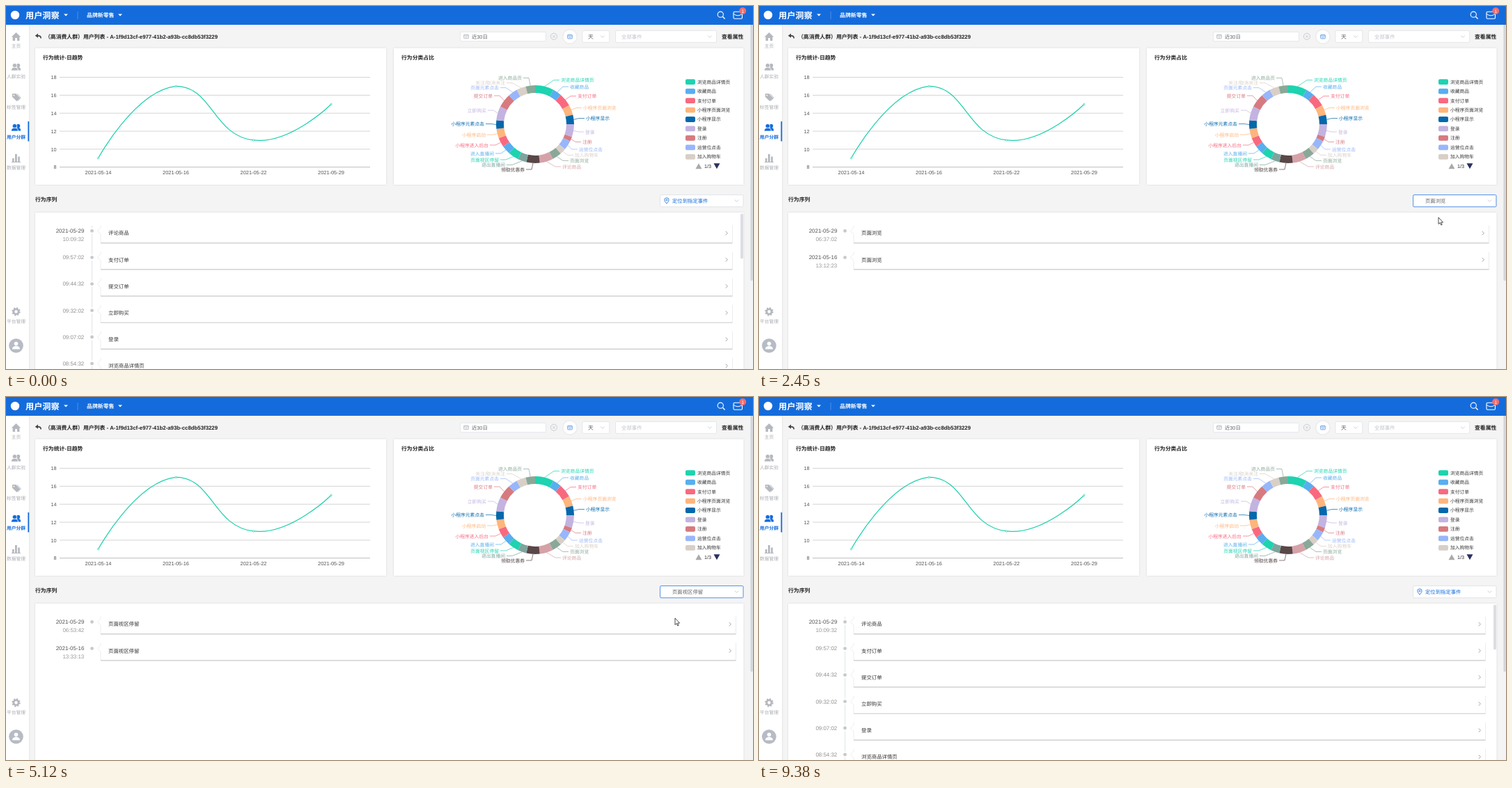
Write an HTML page that moves like this. It is 1073x522 px and loops after 9.49 s.

```html
<!DOCTYPE html>
<html lang="zh-CN">
<head>
<meta charset="utf-8">
<title>用户洞察</title>
<style>
html, body { margin: 0; width: 100%; height: 100%; overflow: hidden; background: #f4f4f5; }
svg { display: block; width: 1073px; height: 522px; }
text { font-family: "Liberation Sans", "Noto Sans CJK SC", "Noto Sans CJK", sans-serif; text-rendering: geometricPrecision; white-space: pre; }
.card { filter: drop-shadow(0 .6px 1px rgba(0,0,0,.13)); }
.pop { filter: drop-shadow(0 1px 3px rgba(0,0,0,.16)); }
</style>
</head>
<body>
<svg id="stage" viewBox="0 0 1073 522" xmlns="http://www.w3.org/2000/svg"></svg>
<script>
const LOOP = 9490, BLUE = '#146cdc', GRAY = '#b5b8be';
const stage = document.getElementById('stage');

// ---- drawing helpers ----
const text = (x, cy, s, size, fill, extra = '') =>
  `<text x="${x}" y="${cy + size * .37}" font-size="${size}" fill="${fill}" ${extra}>${s}</text>`;
const rect = (x, y, w, h, fill, extra = '') =>
  `<rect x="${x}" y="${y}" width="${w}" height="${h}" fill="${fill}" ${extra}/>`;
const path = (d, fill, extra = '') => `<path d="${d}" fill="${fill}" ${extra}/>`;
const line = (d, color, width = 1) => path(d, 'none', `stroke="${color}" stroke-width="${width}"`);
const circle = (x, y, r, fill, extra = '') => `<circle cx="${x}" cy="${y}" r="${r}" fill="${fill}" ${extra}/>`;
const group = (s, extra = '') => `<g ${extra}>${s}</g>`;
const BOLD = 'font-weight="700"', END = 'text-anchor="end"', MID = 'text-anchor="middle"';
const down = (x, y, color = '#c0c4cc', r = 2.8) =>
  line(`M${x - r} ${y - r / 2}L${x} ${y + r / 2}L${x + r} ${y - r / 2}`, color, .8);
const caret = (x, y) => path(`M${x - 3} ${y - 1.4}h6l-3 3z`, '#fff');
const field = (x, y, w, h) => rect(x, y, w, h, '#fff', 'rx="1.5" stroke="#dfe1e6" stroke-width=".8"');
const calendar = (x, y, color) =>
  rect(x - 3.3, y - 2.7, 6.6, 5.6, 'none', `rx=".8" stroke="${color}" stroke-width=".8"`) +
  line(`M${x - 3} ${y - 1}h6M${x - 1.8} ${y + 1}h3.6`, color, .7);

// ---- header and sidebar ----
function header() {
  return rect(0, 0, 1073, 27, BLUE) + circle(13, 13, 6.2, '#fff') +
    text(28, 13.2, '用户洞察', 12.2, '#fff', BOLD) + caret(86, 13) +
    line('M103 8v11', '#5f9be8', .8) +
    text(116, 13.2, '品牌新零售', 7.9, '#fff', BOLD) + caret(164, 13) +
    circle(1026.3, 12.2, 4.1, 'none', 'stroke="#fff" stroke-width="1.1"') + line('M1029.4 15.3l3.2 3.2', '#fff', 1.4) +
    rect(1045, 8.2, 12.5, 10, 'none', 'rx="1.5" stroke="#fff" stroke-width="1.1"') +
    line('M1045 11.3q6.2 5 12.5 0', '#fff', 1) +
    circle(1058.2, 7, 5, '#f56c6c') + text(1058.2, 7, '1', 6.8, '#fff', MID);
}

const people = (y, c) =>
  circle(17.6, y - 2.6, 2.6, c) + path(`M14 ${y + 4.4}q0-4.4 3.6-4.4t3.6 4.4z`, c) +
  group(circle(12.4, y - 2.4, 3.2, c) + path(`M7.4 ${y + 5}q0-4.8 5-4.8t5 4.8z`, c), 'stroke="#fff" stroke-width=".8"');

function sidebar() {
  const names = [['主页', 57.5], ['人群实验', 101], ['标签管理', 145], ['用户分群', 188.5],
    ['数据管理', 232.5], ['平台管理', 453]];
  return rect(0, 27, 33, 495, '#fff', 'class="card"') +
    path('M7.8 44.6 14.5 38l6.7 6.6h-1.8V50h-3.5v-4h-2.8v4H9.6v-5.4z', GRAY) +
    people(88, GRAY) +
    path('M9 126h5.2l6 6.2-4.7 4.8L9 130.8z', GRAY) + circle(11.4, 128.4, 1, '#fff') +
    line('M16 126.2l5 5.6-3.8 4.6', GRAY, 1) +
    people(175, BLUE) + rect(31.4, 166, 1.8, 28.5, BLUE) +
    rect(9, 219, 2.6, 5, GRAY) + rect(13, 213, 2.8, 11, GRAY) + rect(17.2, 216.5, 2.6, 7.5, GRAY) + rect(8, 224, 13, 1, GRAY) +
    circle(14.5, 439.5, 3.6, 'none', `stroke="${GRAY}" stroke-width="2.8"`) +
    circle(14.5, 439.5, 5.3, 'none', `stroke="${GRAY}" stroke-width="1.8" stroke-dasharray="2.08"`) +
    circle(14.5, 488.5, 10.3, '#b6bbc5') + circle(14.5, 485.6, 2.8, '#fff') +
    path('M9 493.6q0-4.6 5.5-4.6t5.5 4.6z', '#fff') +
    names.map(([s, y], i) => i == 3 ? text(14.5, y, s, 6.8, BLUE, MID + ' ' + BOLD)
      : text(14.5, y, s, 6.8, '#a9acb3', MID)).join('');
}

function toolbar() {
  return line('M50 46.6V45q-.6-2.4-4.4-2.4', '#444', 1.6) + path('M41.8 42.8l4.2-3.2v6.2z', '#444') +
    text(56, 44, '（高消费人群）', 7.84, '#222', BOLD) +
    text(110.9, 44, '用户列表 - A-1f9d13cf-e977-41b2-a93b-cc8db53f3229', 7.84, '#222', BOLD) +
    field(652.5, 37.3, 123, 13.4) + calendar(661, 43.8, '#a9adb5') + text(669, 44, '近30日', 7.3, '#606266') +
    circle(787, 43.8, 4.6, 'none', 'stroke="#c0c4cc" stroke-width=".8"') + line('M785.2 42l3.6 3.6m0-3.6l-3.6 3.6', '#c0c4cc', .8) +
    circle(810, 44, 9.6, '#fff', 'class="card"') + calendar(810, 44, '#4a8de4') +
    field(827.9, 35.4, 38.8, 17) + text(836, 44, '天', 7.8, '#606266') + down(857, 44) +
    field(875.6, 35.4, 145, 17) + text(884, 44, '全部事件', 7.4, '#c0c4cc') + down(1011, 44) +
    text(1028, 44, '查看属性', 7.84, '#222', BOLD);
}

// ---- charts ----
function trend() {
  const yOf = v => 231.7 - (v - 8) * 12.92;
  const pts = [[132.5, 9], [244, 17], [355.5, 11], [467, 15]].map(([x, v]) => [x, yOf(v)]);
  const days = ['14', '16', '22', '29'];
  let s = rect(42, 60.5, 504, 196.5, '#fff', 'class="card"') + text(53, 74, '行为统计-日趋势', 7.84, '#222', BOLD);
  for (let v = 8; v <= 18; v += 2)
    s += line(`M77 ${yOf(v)}H523`, v == 8 ? '#b5b5b5' : '#d0d0d0', .9) + text(72.5, yOf(v), v, 7.2, '#555', END);

  // smooth curve: handles follow the neighbours and stay between the extremes
  const gap = (a, b) => Math.hypot(b[0] - a[0], b[1] - a[1]);
  const handle = (i, side) => {
    const a = pts[i - 1], p = pts[i], b = pts[i + 1];
    if (!a || !b) return p;
    const near = side > 0 ? gap(p, b) : gap(a, p), k = side * .5 * near / (gap(a, p) + gap(p, b));
    return [p[0] + (b[0] - a[0]) * k, Math.min(yOf(9), Math.max(yOf(17), p[1] + (b[1] - a[1]) * k))];
  };
  const d = pts.map((p, i) => i ? `C${handle(i - 1, 1)} ${handle(i, -1)} ${p}` : 'M' + p).join('');
  s += line(d, '#1dd0ad', 1.2);
  pts.forEach(([x, y], i) => {
    s += circle(x, y, 1.2, '#fff', 'stroke="#1dd0ad" stroke-width=".7"') +
      text(x, 239, '2021-05-' + days[i], 7.4, '#555', MID);
  });
  return s;
}

const HUES = ['#1dd3b0', '#58aeee', '#f8697f', '#ffb57c', '#0468ab', '#c3b3e1', '#d77a80', '#98b6fa', '#d8cfc7',
  '#8aa898', '#d5a2a8', '#5a4747', '#7fa39d'];
// name, end angle, label x, label y
const PARTS = [
  ['浏览商品详情页', 28, 797, 106.5], ['收藏商品', 41, 810, 116], ['支付订单', 61, 821, 129.5],
  ['小程序页面浏览', 76, 829, 146.5], ['小程序显示', 90, 833, 161.5], ['登录', 109, 832, 181],
  ['注册', 116, 828, 195.5], ['运营位点击', 130, 823, 206], ['加入购物车', 139, 817, 214.5],
  ['页面浏览', 153, 810, 222.5], ['评论商品', 173, 799, 231], ['领取优惠券', 193, 745, 235],
  ['退出直播间', 206, 717, 228.5], ['页面视区停留', 222, 708, 221], ['进入直播间', 235, 701, 212],
  ['小程序进入后台', 249, 693, 200], ['小程序启动', 263, 689, 185], ['小程序元素点击', 276, 687, 169.5],
  ['立即购买', 297, 690, 150], ['提交订单', 318, 699, 129], ['页面元素点击', 332, 708, 117.5],
  ['关注/取消关注', 346, 717, 110.5], ['进入商品页', 360, 741, 103.5]];

function donut() {
  const R = 56, r = 45;
  const at = (a, len) => [760 + len * Math.sin(a * Math.PI / 180), 170 - len * Math.cos(a * Math.PI / 180)];
  let s = rect(557, 60.5, 502.5, 196.5, '#fff', 'class="card"') + text(568, 74, '行为分类占比', 7.84, '#222', BOLD);
  let from = 0;
  PARTS.forEach(([name, to, x, y], i) => {
    const color = i == 22 ? HUES[9] : HUES[i < 13 ? i : i - 13];
    const mid = (from + to) / 2, left = mid > 180, side = left ? 1 : -1;
    s += path(`M${at(from, R)}A${R} ${R} 0 0 1 ${at(to, R)}L${at(to, r)}A${r} ${r} 0 0 0 ${at(from, r)}Z`, color) +
      line(`M${at(mid, R)}L${x + 10 * side} ${y}H${x + 2 * side}`, color, .7) +
      text(x, y, name, 6.8, i == 11 ? '#4b3d3d' : color, left ? END : '');
    from = to;
    if (i < 9) {
      const ly = 109.2 + i * 13.45;
      s += rect(976, ly - 3.9, 14, 7.8, color, 'rx="2"') + text(993, ly, name, 6.75, '#333');
    }
  });
  return s + path('M990.5 234.3h9l-4.5-8z', '#aaa') + text(1003, 230.2, '1/3', 7.2, '#333') +
    path('M1016.5 226.2h9l-4.5 8z', '#2b3160');
}

// ---- event sequence ----
function rows(list, right, joined) {
  const step = 38.15;
  let s = joined ? line('M123.5 316V522', '#e2e4e8', 1) : '';
  list.forEach(([name, time, date], i) => {
    const y = 323.4 + i * step, bottom = y + 17.4;
    s += circle(123.5, y, 3.4, '#c6c8cc', 'stroke="#fff" stroke-width="2"') +
      (date ? text(112.3, y, date, 7.95, '#555', END) + text(112.3, y + 12, time, 7.95, '#999', END)
        : text(112.3, y - .2, time, 7.95, '#8f8f8f', END)) +
      line(`M136 ${y - 8}V${y - 5}L131.5 ${y}L136 ${y + 5}V${bottom}`, '#e9e9e9', .8) +
      line(`M${right} ${y - 8}V${bottom}`, '#e9e9e9', .8) +
      line(`M136 ${bottom}H${right}`, '#c9c9c9', 1.2) +
      text(147, y + 3.3, name, 7.4, '#333') +
      line(`M${right - 9.7} ${y + .6}l2.6 2.7-2.6 2.7`, '#999', .9);
  });
  return s;
}

const SKY = 'url(#sky)';
const cloud = () => `<linearGradient id="sky" gradientUnits="userSpaceOnUse" x1="528" y1="494" x2="560" y2="464">
  <stop offset="0" stop-color="#b2b4e6"/><stop offset="1" stop-color="#84dbf8"/></linearGradient>` +
  circle(546, 476.5, 14.3, SKY) + circle(533, 484.2, 10, SKY) + circle(558, 484.8, 9.5, SKY) + rect(533, 478, 25, 16.3, SKY) +
  text(545.2, 479.5, '?', 22, '#fff', MID) +
  text(506, 511, '当前筛选条件无数据...', 7.84, '#333');

const FULL = [['评论商品', '10:09:32', '2021-05-29'], ['支付订单', '09:57:02'], ['提交订单', '09:44:32'],
  ['立即购买', '09:32:02'], ['登录', '09:07:02'], ['浏览商品详情页', '08:54:32']];
const pair = (name, a, b) => rows([[name, a, '2021-05-29'], [name, b, '2021-05-16']], 1048.5, false);

const OPTIONS = ['页面浏览', '页面视区停留', '页面元素点击', '小程序启动', '小程序显示',
  '小程序页面浏览', '小程序元素点击', '小程序进入后台'];

const menu = () =>
  group(path('M940 296H958.5L963 291.5L967.5 296H1059V445H940Z', '#fff'), 'class="pop"') +
  rect(940, 299.5, 119, 19, '#f5f7fa', 'id="hover"') +
  OPTIONS.map((s, i) => text(951, 309 + i * 19, s, 7.95, '#606266', 'class="option"')).join('') +
  rect(1054.6, 298, 3.2, 37, '#dddee1', 'id="thumb" rx="1.6"');

const select = () =>
  rect(939.6, 271.6, 119.4, 17.2, '#fff', 'id="box" rx="1.5" stroke-width=".9"') +
  group(path('M949 284.2q-3.2-3.4-3.2-5.2a3.2 3.2 0 0 1 6.4 0q0 1.8-3.2 5.2z', 'none', `stroke="${BLUE}" stroke-width=".8"`) +
    circle(949, 279, 1.1, 'none', `stroke="${BLUE}" stroke-width=".7"`), 'id="pin"') +
  text(957, 280.2, '', 7.35, BLUE, 'id="value"') +
  group(down(1049.5, 280), 'id="arrow"') +
  group(circle(1049.5, 280, 3.7, 'none', 'stroke="#c0c4cc" stroke-width=".8"') +
    line('M1048 278.5l3 3m0-3l-3 3', '#c0c4cc', .8), 'id="clear"');

stage.innerHTML = rect(0, 0, 1073, 522, '#f4f4f5') + toolbar() + trend() + donut() +
  text(42, 278.5, '行为序列', 7.84, '#222', BOLD) +
  rect(42, 297, 1017.5, 240, '#fff', 'class="card"') +
  group(rows(FULL, 1043.5, true) + rect(1055, 298.5, 4, 65, '#dcdee2', 'rx="2"'), 'id="full"') +
  group(pair('页面浏览', '06:37:02', '13:12:23'), 'id="views"') +
  group(pair('页面视区停留', '06:53:42', '13:33:13'), 'id="stays"') +
  group(cloud(), 'id="empty"') +
  select() + group(menu(), 'id="menu"') + sidebar() +
  rect(1069, 0, 4, 522, '#f3f4f6') + rect(1069.4, 0, 3.4, 395, '#d3d5d9', 'rx="1.5"') + header() +
  group(
    path('M0 0V9.6L2.2 7.6L3.8 11L5.2 10.4L3.7 7.1H6.6Z', '#fff', 'id="pointer" stroke="#222" stroke-width=".8"') +
    path('M-1 7V1a1 1 0 0 1 2 0V5l4 .9q1.5 .4 1.4 2l-.5 2.7-.8 2.2H.2L-3.4 8.4q-.5-1.5 .9-1.5L-1 8Z', '#fff',
      'id="hand" stroke="#222" stroke-width=".8"'), 'id="cursor"');

// ---- motion ----
const el = {};
stage.querySelectorAll('[id]').forEach(n => el[n.id] = n);
const options = [...stage.querySelectorAll('.option')];

// start, end, from x y, control x y, to x y
const MOVES = [
  [420, 1090, 1070, 521, 1010, 330, 984, 265], [1090, 1270, 984, 265, 976, 267, 975.5, 276.5],
  [1560, 1920, 975.5, 276.5, 974, 290, 976, 304], [3200, 3330, 976, 304, 977, 297, 976, 290],
  [3450, 3560, 976, 290, 975, 284, 975.5, 278], [3780, 4330, 975.5, 278, 974, 305, 981.5, 326],
  [4800, 5120, 981.5, 326, 968, 326, 961, 318], [5700, 5980, 961, 318, 965, 290, 1000, 283],
  [5980, 6390, 1000, 283, 1060, 330, 1075, 524], [6590, 6790, 1065, 518, 1044, 420, 1040, 300],
  [6790, 6910, 1040, 300, 1040, 284, 1047.5, 279.5], [8550, 9180, 1047.5, 279.5, 1085, 400, 1060.5, 521]];
const HIDDEN = [[0, 420], [6390, 6590], [9380, LOOP]];
const OPENED = [[1295, 1980], [3600, 4475]];

const within = (t, [a, b]) => t >= a && t < b;
const clamp = v => Math.min(1, Math.max(0, v));
const smooth = v => v * v * (3 - 2 * v);

// cubic-bezier(.23, 1, .32, 1)
function easeOut(x) {
  if (x <= 0 || x >= 1) return clamp(x);
  let lo = 0, hi = 1, s;
  for (let i = 0; i < 20; i++) {
    s = (lo + hi) / 2;
    .69 * s * (1 - s) ** 2 + .96 * s * s * (1 - s) + s ** 3 < x ? lo = s : hi = s;
  }
  return 1 - (1 - s) ** 3;
}

function cursorAt(t) {
  const m = MOVES.filter(v => v[0] <= t).pop() || MOVES[0];
  const [a, b, x0, y0, cx, cy, x1, y1] = m, k = smooth(clamp((t - a) / (b - a))), j = 1 - k;
  return [j * j * x0 + 2 * j * k * cx + k * k * x1, j * j * y0 + 2 * j * k * cy + k * k * y1];
}

const openness = (t, ease) => Math.max(...OPENED.map(([a, b]) =>
  t < b ? ease(clamp((t - a) / 300)) : 1 - ease(clamp((t - b) / 300))));
const show = (node, on) => node.setAttribute('display', on ? 'inline' : 'none');

function render(t) {
  const [x, y] = cursorAt(t), open = openness(t, easeOut);
  const visible = !HIDDEN.some(h => within(t, h));
  const overBox = visible && x > 939 && x < 1060 && y > 271 && y < 289;
  const overMenu = visible && open > .01 && y > 296;
  const chosen = within(t, [1980, 4460]) ? 0 : within(t, [4460, 7160]) ? 1 : -1;

  show(el.full, t < 1980 || t >= 8050);
  show(el.views, within(t, [2450, 4460]));
  show(el.stays, within(t, [5120, 7160]));
  show(el.empty, within(t, [1980, 2450]) || within(t, [4460, 5120]) || within(t, [7160, 8050]));

  show(el.pin, chosen < 0);
  el.value.textContent = chosen < 0 ? '定位到指定事件' : OPTIONS[chosen];
  el.value.setAttribute('fill', chosen < 0 ? BLUE : '#606266');
  el.box.setAttribute('stroke', within(t, [1295, 7200]) ? '#3f83df' : overBox ? '#c0c4cc' : '#dfe1e6');
  const clearing = overBox && chosen >= 0 && open < .01;
  show(el.clear, clearing);
  show(el.arrow, !clearing);
  el.arrow.setAttribute('transform', `rotate(${180 * openness(t, smooth)} 1049.5 280)`);

  show(el.menu, open > .005);
  el.menu.setAttribute('transform', `translate(0 ${296 * (1 - open)}) scale(1 ${open})`);
  el.menu.setAttribute('opacity', open);
  const hovered = Math.floor((y - 299.5) / 19);
  show(el.hover, overMenu && hovered >= 0);
  el.hover.setAttribute('y', 299.5 + 19 * hovered);
  show(el.thumb, overMenu);
  options.forEach((o, i) => {
    o.setAttribute('fill', i == chosen ? BLUE : '#606266');
    o.setAttribute('font-weight', i == chosen ? 700 : 400);
  });

  show(el.cursor, visible);
  el.cursor.setAttribute('transform', `translate(${x} ${y})`);
  show(el.hand, overBox || overMenu);
  show(el.pointer, !(overBox || overMenu));
}

const start = performance.now();
function tick() {
  render((performance.now() - start) % LOOP);
  requestAnimationFrame(tick);
}
render(0);
tick();
</script>
</body>
</html>
```
